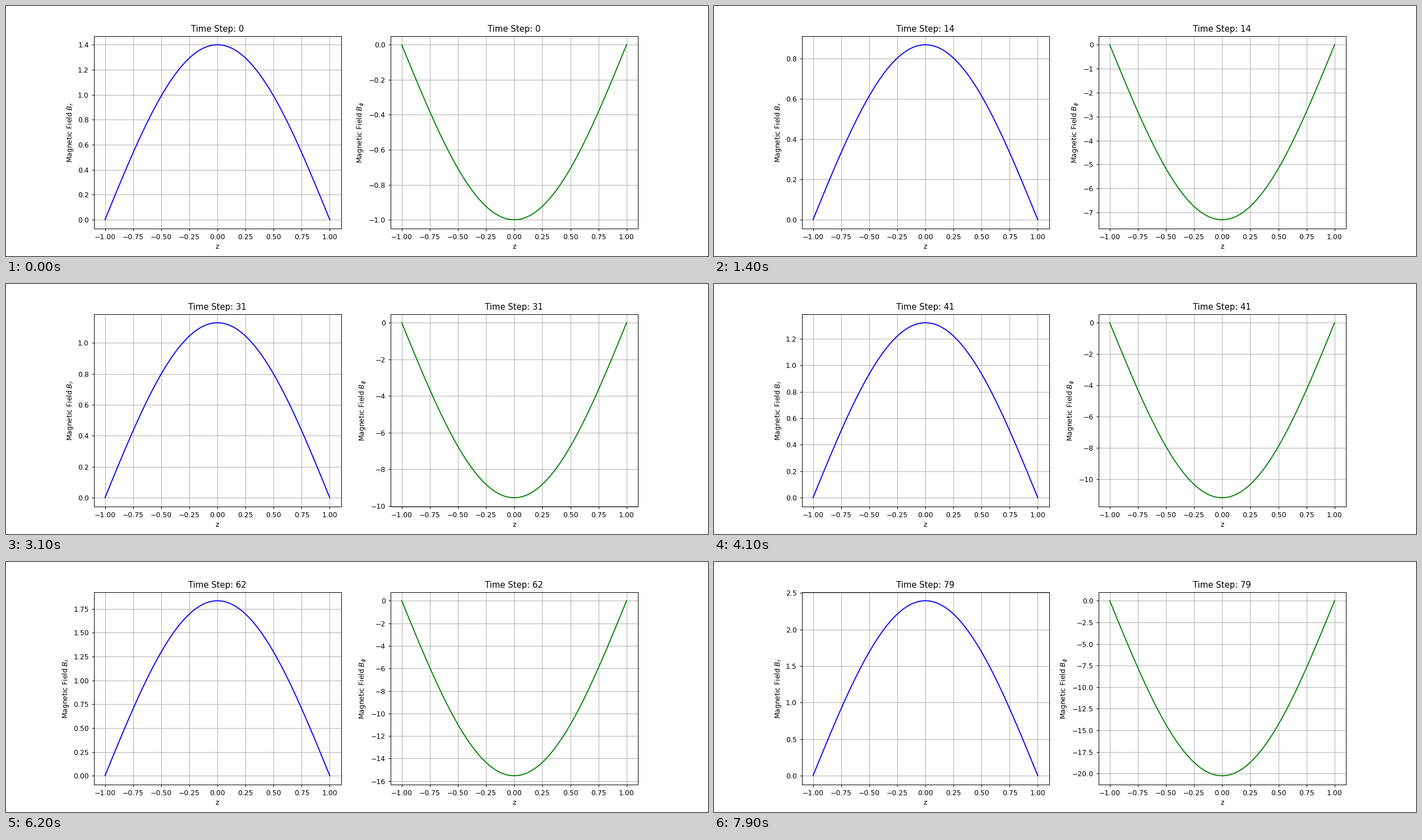
A matplotlib script for the animation above (8 s loop, 1252 by 447 pixels).

```python
import matplotlib.pyplot as plt
import numpy as np
from matplotlib.animation import FuncAnimation

WIDTH, HEIGHT = 1252, 447
DPI = WIDTH / 14  # the figure is 14 inches wide
FRAMES = 80
INTERVAL = 100  # ms

# The field is the sum of a slowly growing and a quickly decaying mode.
GROWTH = np.exp(0.01565)
DECAY = 0.6795
BR_START, BPHI_START = 1.4, -1.0
BR_GROWING, BPHI_GROWING = 0.6954, -5.884

z = np.linspace(-1, 1, 101)
profile = np.cos(np.pi * z / 2)


def amplitude(step, start, growing):
    return growing * GROWTH**step + (start - growing) * DECAY**step


def inches(pixels):
    # The tiny excess keeps the canvas size from truncating one pixel short.
    return (pixels + 1e-4) / DPI


def make_panel(ax, color, label):
    line, = ax.plot(z, profile, color=color)
    ax.set_xlabel("z")
    ax.set_ylabel(f"Magnetic Field {label}")
    ax.grid(True)
    return line


fig, axes = plt.subplots(1, 2, figsize=(inches(WIDTH), inches(HEIGHT)), dpi=DPI)
panels = [
    (axes[0], make_panel(axes[0], "blue", "$B_r$"), BR_START, BR_GROWING),
    (axes[1], make_panel(axes[1], "green", r"$B_\phi$"), BPHI_START, BPHI_GROWING),
]


def update(step):
    for ax, line, start, growing in panels:
        line.set_ydata(amplitude(step, start, growing) * profile)
        ax.relim()
        ax.autoscale_view()
        ax.set_title(f"Time Step: {step}")
    return [line for _, line, _, _ in panels]


anim = FuncAnimation(fig, update, frames=FRAMES, init_func=lambda: update(0),
                     interval=INTERVAL, repeat=True, repeat_delay=0)

plt.show()
```
